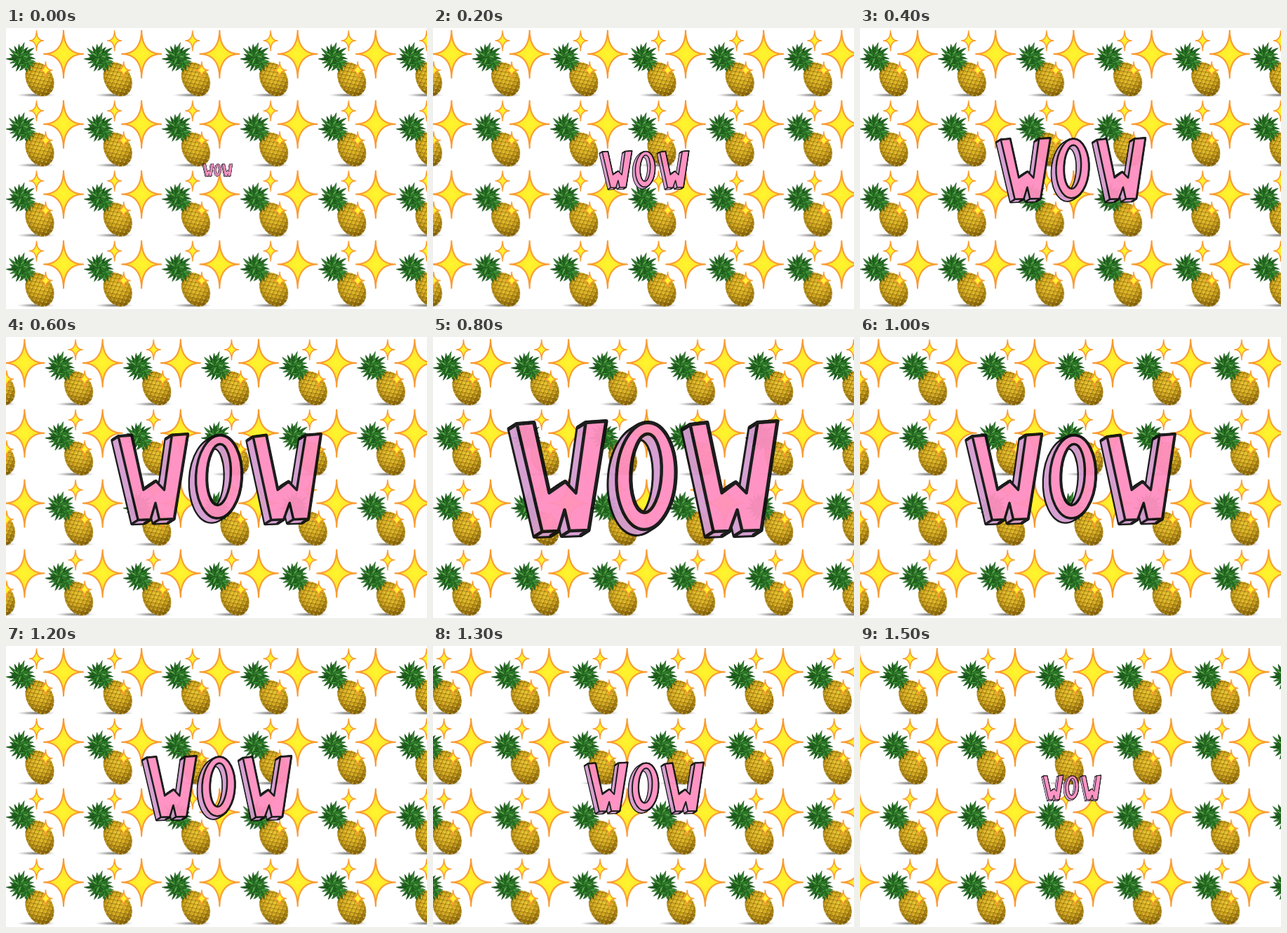
Animation of 600x400 px, one loop 1600 ms. Source, as an HTML page with a canvas:

```html
<!DOCTYPE html>
<html lang="en">
<head>
<meta charset="utf-8">
<title>Wow pineapples</title>
<style>
  html, body { margin: 0; width: 100%; height: 100%; overflow: hidden; background: #fff; }
  canvas { display: block; }
</style>
</head>
<body>
<canvas id="stage" width="600" height="400"></canvas>
<script>
const STEP = 100, STEPS = 16, TILE_W = 111.2, TILE_H = 99.8;
const ctx = document.getElementById('stage').getContext('2d');
ctx.imageSmoothingQuality = 'high';

function layer(w, h, scale = 1) {
  const c = document.createElement('canvas');
  c.width = w * scale;
  c.height = h * scale;
  const g = c.getContext('2d');
  g.scale(scale, scale);
  return g;
}

function radial(g, x, y, r, ...colors) {
  const fill = g.createRadialGradient(x, y, 0, x, y, r);
  colors.forEach((c, i) => fill.addColorStop(i / (colors.length - 1), c));
  return fill;
}

function star(g, x, y, rx, ry, line) {
  const k = 0.02;
  g.save();
  g.translate(x, y);
  g.beginPath();
  g.moveTo(0, -ry);
  g.quadraticCurveTo(rx * k, -ry * k, rx, 0);
  g.quadraticCurveTo(rx * k, ry * k, 0, ry);
  g.quadraticCurveTo(-rx * k, ry * k, -rx, 0);
  g.quadraticCurveTo(-rx * k, -ry * k, 0, -ry);
  g.fillStyle = radial(g, 0, 0, ry, '#fff62e', '#ffe82c', '#fbb02a');
  g.fill();
  g.strokeStyle = '#f8982f';
  g.lineWidth = line;
  g.lineJoin = 'round';
  g.stroke();
  g.restore();
}

function leaf(g, x, y, angle, length, width, color) {
  g.save();
  g.translate(x, y);
  g.rotate(angle);
  g.beginPath();
  g.moveTo(0, -width * 0.5);
  g.quadraticCurveTo(length * 0.6, -width * 1.3, length, 0);
  g.quadraticCurveTo(length * 0.5, width * 0.3, 0, width * 0.5);
  g.fillStyle = color;
  g.fill();
  g.strokeStyle = '#154a14';
  g.lineWidth = 0.5;
  g.stroke();
  g.restore();
}

function ring(g, x, y, count, length, width, colors, turn) {
  for (let i = 0; i < count; i++) {
    const reach = length * (0.9 + 0.12 * Math.sin(i * 2.6));
    leaf(g, x, y, turn + i * 2 * Math.PI / count, reach, width, colors[i % colors.length]);
  }
}

function body(g) {
  g.save();
  g.translate(48, 73);
  g.rotate(-0.48);
  g.beginPath();
  g.ellipse(0, 0, 19, 25.3, 0, 0, 7);
  g.fillStyle = radial(g, 3, -5, 29, '#e8c42f', '#d3a81f', '#86630c');
  g.fill();
  g.clip();
  g.strokeStyle = 'rgba(112,80,8,.5)';
  g.lineWidth = 0.9;
  for (let i = -9; i < 10; i++) {
    for (const side of [-1, 1]) {
      g.beginPath();
      g.moveTo(-22 * side, i * 7 - 17);
      g.quadraticCurveTo(0, i * 7 + 3, 22 * side, i * 7 + 17);
      g.stroke();
    }
  }
  for (let row = -7; row < 8; row++) {
    for (let col = -3; col < 4; col++) {
      const x = col * 9 + (row & 1) * 4.5, y = row * 3.5;
      g.fillStyle = 'rgba(246,222,88,.7)';
      g.fillRect(x - 1, y - 1.4, 2, 1.6);
      g.fillStyle = 'rgba(115,80,6,.6)';
      g.fillRect(x - 0.7, y + 0.5, 1.4, 1);
    }
  }
  g.restore();
}

function makeTile() {
  const g = layer(114, 100, 2);
  g.save();
  g.translate(43, 95.5);
  g.scale(1, 0.1);
  g.fillStyle = radial(g, 0, 0, 28, 'rgba(40,40,40,.7)', 'rgba(80,80,80,.4)', 'rgba(120,120,120,0)');
  g.fillRect(-28, -28, 56, 56);
  g.restore();
  body(g);
  ring(g, 22, 42, 17, 22, 3.6, ['#236b22', '#378a33', '#1b591b'], 0.1);
  ring(g, 28, 49, 11, 14, 3.6, ['#3f9437', '#286f25'], 0.5);
  ring(g, 21, 40, 11, 14, 3, ['#59a848', '#2f7d2c', '#22661f'], 0.2);
  star(g, 82, 37, 28, 34, 2);
  star(g, 43.5, 18, 10, 14.5, 1.5);
  star(g, 56.5, 60, 9.5, 12.5, 1.5);
  return g.canvas;
}

// Lettering at full size; the sides extend down and to the left.
const letters = [
  [[119, 124], [143, 122], [165, 222], [188, 206], [203, 222], [217, 122], [246, 120],
   [221, 275], [194, 276], [187, 246], [178, 276], [155, 277]],
  [[366, 125], [390, 122], [411, 222], [431, 207], [446, 222], [462, 122], [490, 120],
   [467, 275], [440, 276], [433, 246], [422, 276], [399, 277]]
];
const SIDE = [-11, 7];
const wow = new Path2D();
const edges = new Path2D();
for (const points of letters) {
  points.forEach(([x, y], i) => {
    wow[i ? 'lineTo' : 'moveTo'](x, y);
    edges.moveTo(x, y);
    edges.lineTo(x + SIDE[0], y + SIDE[1]);
  });
  wow.closePath();
}
for (const [x, y, rx, ry] of [[303, 198, 42, 76], [303, 194, 22, 56]]) {
  wow.moveTo(x + rx, y);
  wow.ellipse(x, y, rx, ry, 0.05, 0, 2 * Math.PI);
}

const word = layer(600, 400);

function extrude(draw) {
  for (let i = 0; i <= 12; i++) {
    word.save();
    word.translate(SIDE[0] * i / 12, SIDE[1] * i / 12);
    draw();
    word.restore();
  }
}

function drawWord(k) {
  const scale = 0.11 + 0.11125 * k;
  word.clearRect(0, 0, 600, 400);
  word.save();
  word.translate(301.5 - 0.3 * k, 202.5);
  word.scale(scale, scale);
  word.translate(-298.5, -202.5);
  word.lineJoin = word.lineCap = 'round';
  word.strokeStyle = '#111';
  word.lineWidth = 6;
  extrude(() => word.stroke(wow));
  word.fillStyle = '#d49bd0';
  extrude(() => word.fill(wow, 'evenodd'));
  word.lineWidth = 4.5;
  word.stroke(edges);
  word.fillStyle = '#ff8fc1';
  word.fill(wow, 'evenodd');
  word.stroke(wow);
  word.restore();
  ctx.globalAlpha = 0.95;
  ctx.drawImage(word.canvas, 0, 0);
  ctx.globalAlpha = 1;
}

const tile = makeTile();

function render(now) {
  const step = Math.floor(now / STEP) % STEPS;
  const shift = (step % 4) * TILE_W / 4;
  ctx.fillStyle = '#fff';
  ctx.fillRect(0, 0, 600, 400);
  for (let row = 0; row < 4; row++) {
    for (let col = 0; col < 7; col++) {
      ctx.drawImage(tile, col * TILE_W - shift, row * TILE_H, 114, 100);
    }
  }
  drawWord(8 - Math.abs(8 - step));
  requestAnimationFrame(render);
}
requestAnimationFrame(render);
</script>
</body>
</html>
```
